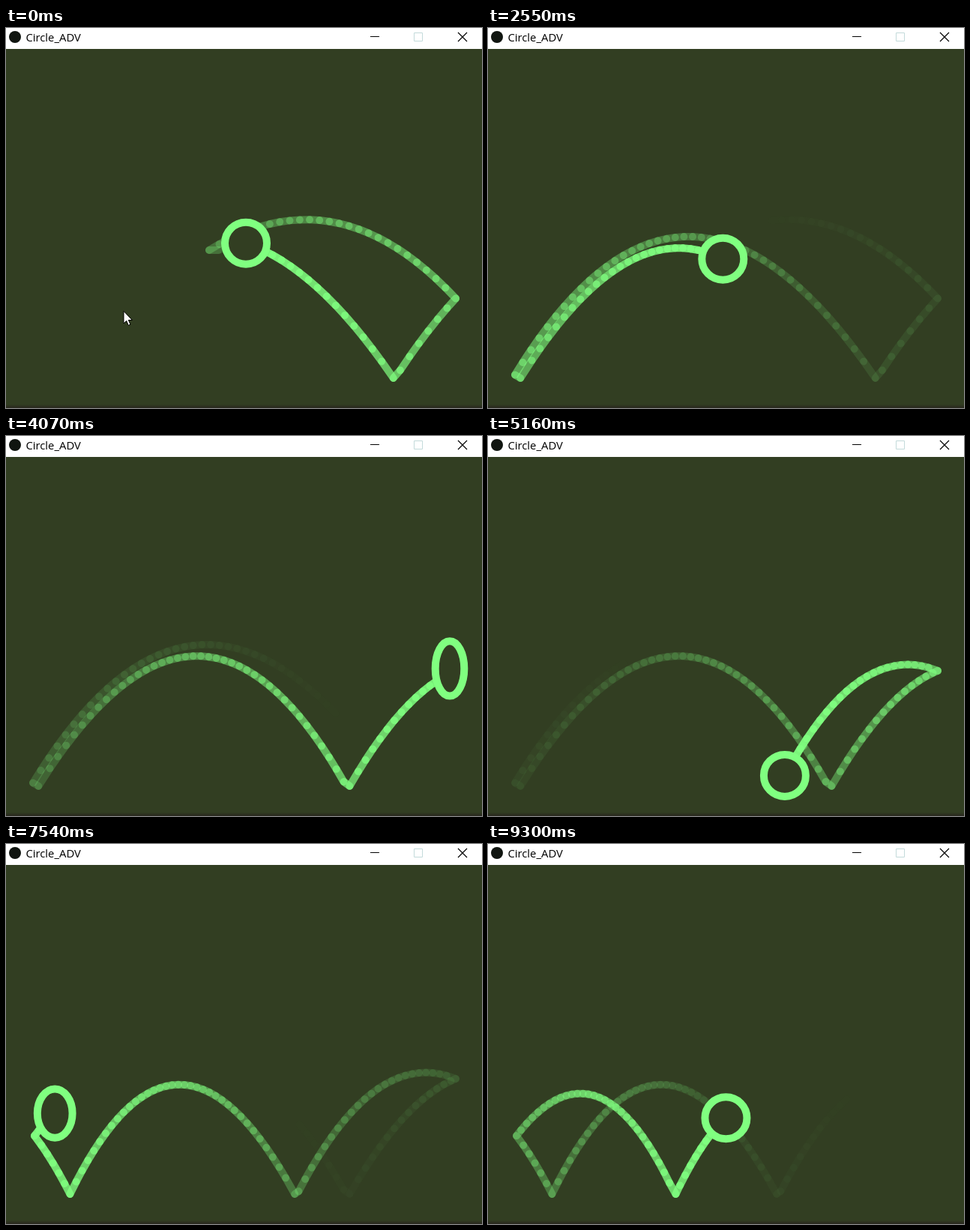
Recreate the animation shown at these times as an HTML page with a canvas. Size 635 by 508 pixels, loop 9340 ms.

```html
<!DOCTYPE html>
<html lang="en">
<head>
<meta charset="utf-8">
<title>Circle_ADV</title>
<style>
  html, body { margin: 0; width: 100%; height: 100%; overflow: hidden; background: #323e22; }
  canvas, svg { position: absolute; left: 0; top: 0; display: block; }
  text { font: 14.8px "Open Sans", "Noto Sans", sans-serif; }
</style>
</head>
<body>
<canvas id="stage" width="635" height="508"></canvas>
<svg width="635" height="508" viewBox="0 0 635 508">
  <rect width="635" height="28" fill="#fff"/>
  <circle cx="12" cy="12" r="8" fill="#101510"/>
  <text x="26.5" y="18">Circle_ADV</text>
  <g fill="none" stroke="#000">
    <path d="M486 11.5h12"/>
    <path d="M544.5 6.5h11v11h-11z" stroke="#c3dada"/>
    <path d="M603 6l12 12m0-12l-12 12" stroke-width="1.2"/>
  </g>
  <path id="cursor" d="M157 378.500v16.500l3.700-3.500 2.600 6 2.700-1.200-2.600-5.800h5z" fill="#fff" stroke="#000"/>
</svg>
<script>
const LOOP = 9340, TICK = 47.44, LAST = 196;
const BG = '#323e22', GREEN = '128,255,128';
const FLOOR = 468, GRAVITY = 0.792, SPEED = 11.2, DRAG = 0.0028;
const STEP = 1.0545, LIFE = 105, FIRST_DOT = -48;

// Travelled distance and the x reached there; x is linear in between.
const turns = [[-610, 270], [-280, 600], [284, 36], [848, 600], [1410, 38], [1750, 378]];

// Ticks at which the ball leaves the floor and lands again.
const jumps = [
  [-63.6, -17.35], [-17.15, 26.55], [27, 68.9], [69.4, 109.9],
  [110.3, 148.75], [148.75, 185.6], [185.8, 221.2]
];

const reach = SPEED / DRAG;
const distance = n => reach * (1 - Math.exp(-DRAG * n));
const wallHits = turns.slice(1, -1).map(([d]) => -Math.log(1 - d / reach) / DRAG);
const hits = [
  ...jumps.map(([n]) => ({ n, floor: true })),
  ...wallHits.map(n => ({ n, floor: false }))
].sort((a, b) => a.n - b.n);

function position(n) {
  const d = distance(n);
  const i = turns.findIndex(p => p[0] > d);
  const [d0, x0] = turns[i - 1], [d1, x1] = turns[i];
  const [leave, land] = jumps.filter(j => j[0] <= n).pop();
  const height = GRAVITY / 2 * (n - leave) * (land - n);
  return {
    x: x0 + (x1 - x0) * (d - d0) / (d1 - d0),
    y: FLOOR - Math.max(0, height)
  };
}

// Trail dots are evenly spaced in time, snapped to a nearby bounce.
const dots = [{ n: -51.6, x: 284, y: 297 }];
for (let i = FIRST_DOT; i * STEP < LAST; i++) {
  const hit = hits.find(h => Math.abs(h.n - i * STEP) < STEP / 2);
  const n = hit ? hit.n : i * STEP;
  dots.push({ n, ...position(n) });
}

const cursor = document.getElementById('cursor');
const ctx = document.getElementById('stage').getContext('2d');
ctx.lineWidth = 10;
ctx.lineCap = 'round';
const edge = ctx.createLinearGradient(0, 503, 0, 508);
edge.addColorStop(0, BG);
edge.addColorStop(1, '#28261e');

function drawTrail(n, ball) {
  for (let i = 0; i < dots.length && dots[i].n < n; i++) {
    const a = dots[i];
    const fade = 1 - (n - a.n) / LIFE;
    if (fade <= 0) continue;
    const next = dots[i + 1];
    const b = next && next.n < n ? next : ball;
    ctx.strokeStyle = `rgba(${GREEN},${fade * fade})`;
    ctx.beginPath();
    ctx.moveTo(a.x, a.y);
    ctx.lineTo(b.x, b.y);
    ctx.stroke();
  }
}

function drawBall(n, ball) {
  const hit = hits.filter(h => h.n <= n).pop();
  const squash = Math.max(0, 10 * (1 - (n - hit.n) / 7)) * (hit.floor ? 1 : -1);
  ctx.beginPath();
  ctx.ellipse(ball.x, ball.y, 28 + squash, 28 - squash, 0, 0, 2 * Math.PI);
  ctx.fillStyle = BG;
  ctx.fill();
  ctx.strokeStyle = `rgb(${GREEN})`;
  ctx.stroke();
}

function draw() {
  const t = performance.now() % LOOP;
  const n = Math.min(LAST, Math.floor((t + 14) / TICK));
  const ball = position(n);
  ctx.fillStyle = BG;
  ctx.fillRect(0, 0, 635, 508);
  ctx.fillStyle = edge;
  ctx.fillRect(0, 503, 635, 5);
  drawTrail(n, ball);
  drawBall(n, ball);
  cursor.style.visibility = n === 0 ? 'visible' : 'hidden';
  requestAnimationFrame(draw);
}
draw();
</script>
</body>
</html>
```
